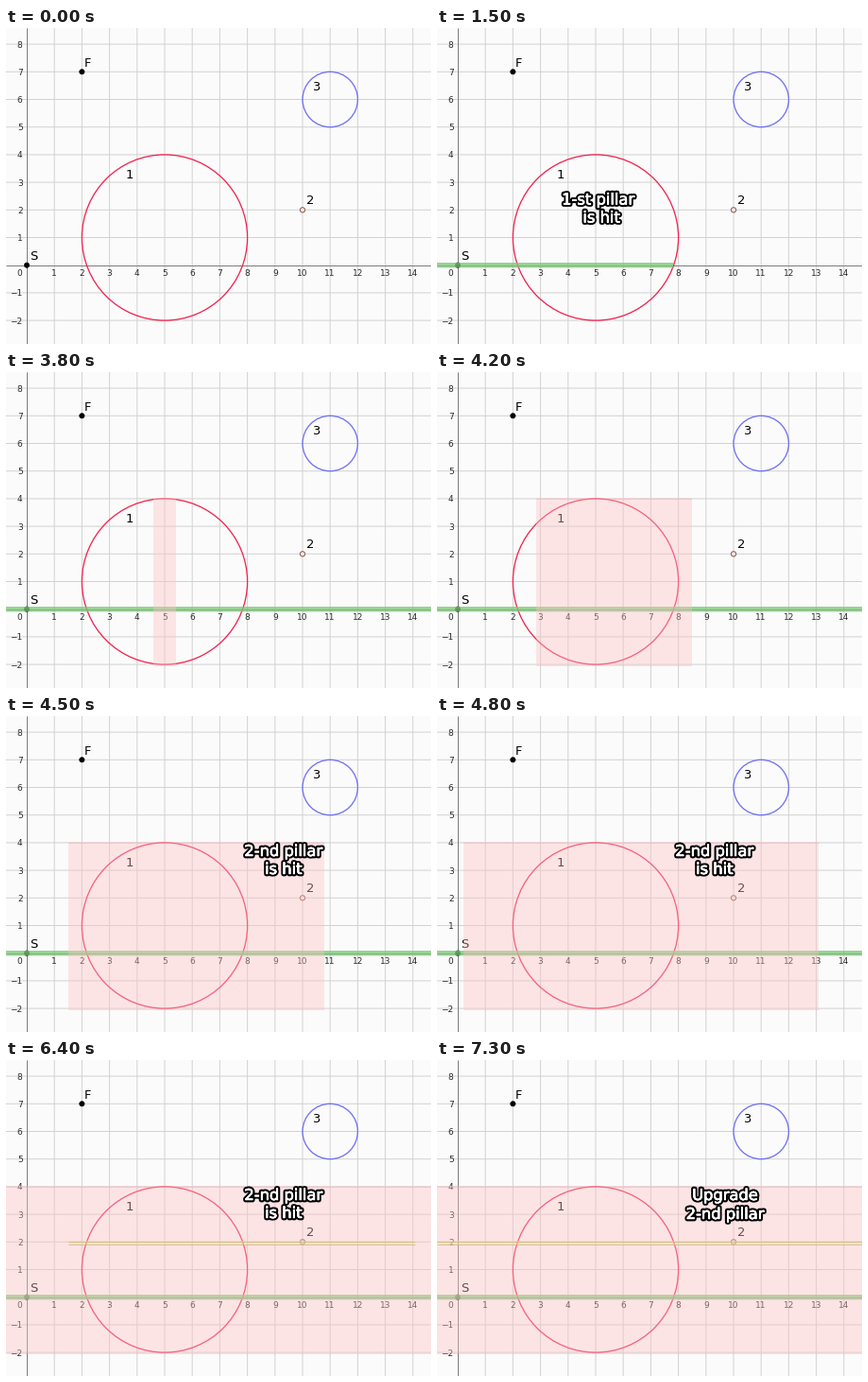
A matplotlib script for the animation above (8000 ms loop, 450 by 334 pixels).

```python
import matplotlib.pyplot as plt
from matplotlib.animation import FuncAnimation
from matplotlib.patches import Circle, Rectangle
from matplotlib.patheffects import Normal, withStroke

W, H, DPI = 450, 334, 100
PT = 72 / DPI                      # one pixel in points
STEP_MS, FRAMES = 100, 80
UNIT, X0, Y0 = 29.2, 22, 250.7     # plot scale and origin in pixels

plt.rcParams["font.family"] = "DejaVu Sans"
fig = plt.figure(figsize=(W / DPI, H / DPI), dpi=DPI, facecolor="#fbfbfb")
ax = fig.add_axes([0, 0, 1, 1])
ax.set_xlim(0, W)
ax.set_ylim(H, 0)
ax.axis("off")


def px(x):
    return X0 + UNIT * x


def py(y):
    return Y0 - UNIT * y


def line(xs, ys, color, width=1, z=1, snap=True):
    return ax.plot(xs, ys, color=color, lw=width * PT, zorder=z, snap=snap,
                   solid_capstyle="butt")[0]


def grid(xs, ys):
    line(xs, ys, "#d2d2d2", snap=False)


def label(x, y, s, size, color="black", ha="center"):
    ax.text(x, y, s, size=size * PT, color=color, ha=ha,
            va="center_baseline", zorder=3)


def circle(x, y, r, edge, face="none", width=1.3):
    ax.add_patch(Circle((px(x), py(y)), r, ec=edge, fc=face,
                        lw=width * PT, zorder=4))


def caption(*rows):
    """White comic-style lettering with a heavy black outline."""
    fx = [withStroke(linewidth=4.8 * PT, foreground="black"),
          withStroke(linewidth=0.6 * PT, foreground="white"), Normal()]
    return [ax.text(x, y, s, size=16.3 * PT, color="white", ha="center",
                    va="baseline", path_effects=fx, zorder=10)
            for x, y, s in rows]


class Band:
    """Horizontal beam with inner edge lines, spanning a variable x range."""

    def __init__(self, top, bottom, fill, alpha, edge, edge_alpha, z):
        self.box = Rectangle((0, top), 0, bottom - top, fc=fill, ec="none",
                             alpha=alpha, zorder=z)
        ax.add_patch(self.box)
        self.rims = [line([0, 0], [y, y], edge, 1, z + 0.1)
                     for y in (top + 0.5, bottom - 0.5)]
        for rim in self.rims:
            rim.set_alpha(edge_alpha)

    def span(self, left, right, on):
        left, right = max(left, 0), min(right, W)
        self.box.set_x(left)
        self.box.set_width(right - left)
        self.box.set_visible(on)
        for rim in self.rims:
            rim.set_xdata([left, right])
            rim.set_visible(on)


# coordinate plane
for i in range(1, 15):
    grid([px(i)] * 2, [0, H])
    label(px(i), 258.6, str(i), 9, "#2b2b2b")
for j in range(-2, 9):
    if j:
        grid([0, W], [py(j)] * 2)
        label(17.6, py(j), str(j).replace("-", "\u2212"), 9, "#2b2b2b",
              "right")
label(14.2, 258.6, "0", 9, "#2b2b2b")
line([X0, X0], [0, H], "#7c7c7c", 1, 2)
line([0, W], [Y0, Y0], "#7c7c7c", 1, 2)

# pillars and end points
circle(5, 1, 3 * UNIT, "#f3224f")
circle(11, 6, UNIT, "#6f6ff8")
circle(10, 2, 2.6, "#8c6a5c", "#f3e6df", 1.1)
for x, y in ((0, 0), (2, 7)):
    circle(x, y, 2.7, "black", "black", 0.5)
for x, y, s in ((131, 154, "1"), (322, 181, "2"), (328, 61, "3"),
                (86, 36, "F"), (29, 240, "S")):
    label(x, y, s, 13)

green = Band(248, 253, "#7cc878", 0.75, "#7cc878", 0.3, 5)
red = Band(133, 310, "#ffc2c4", 0.4, "#d99a9a", 0.25, 6)
amber = Band(191, 195, "#efdca8", 0.4, "#cdb97c", 0.75, 7)

hit1 = caption((170.5, 186.5, "1-st pillar"), (174, 205.5, "is hit"))
hit2 = caption((293.7, 148, "2-nd pillar"), (293.7, 167, "is hit"))
upgrade = caption((305, 148, "Upgrade"), (305, 168, "2-nd pillar"))


def show(rows, on):
    for row in rows:
        row.set_visible(on)


def update(n):
    t = n * STEP_MS
    k = n - 4
    green.span(0, 22.7 * k, t >= 500)
    k = n - 38
    red.span(156 - 12.8 * k, 180 + 22.4 * k, t >= 3800)
    k = n - 57
    amber.span(293 - 32.5 * k, 328 + 15 * k, t >= 5700)
    show(hit1, 800 <= t < 2400)
    show(hit2, 4400 <= t < 6700)
    show(upgrade, t >= 7300)
    return []


anim = FuncAnimation(fig, update, frames=FRAMES, interval=STEP_MS,
                     init_func=lambda: update(0), repeat=True, repeat_delay=0)
plt.show()
```
